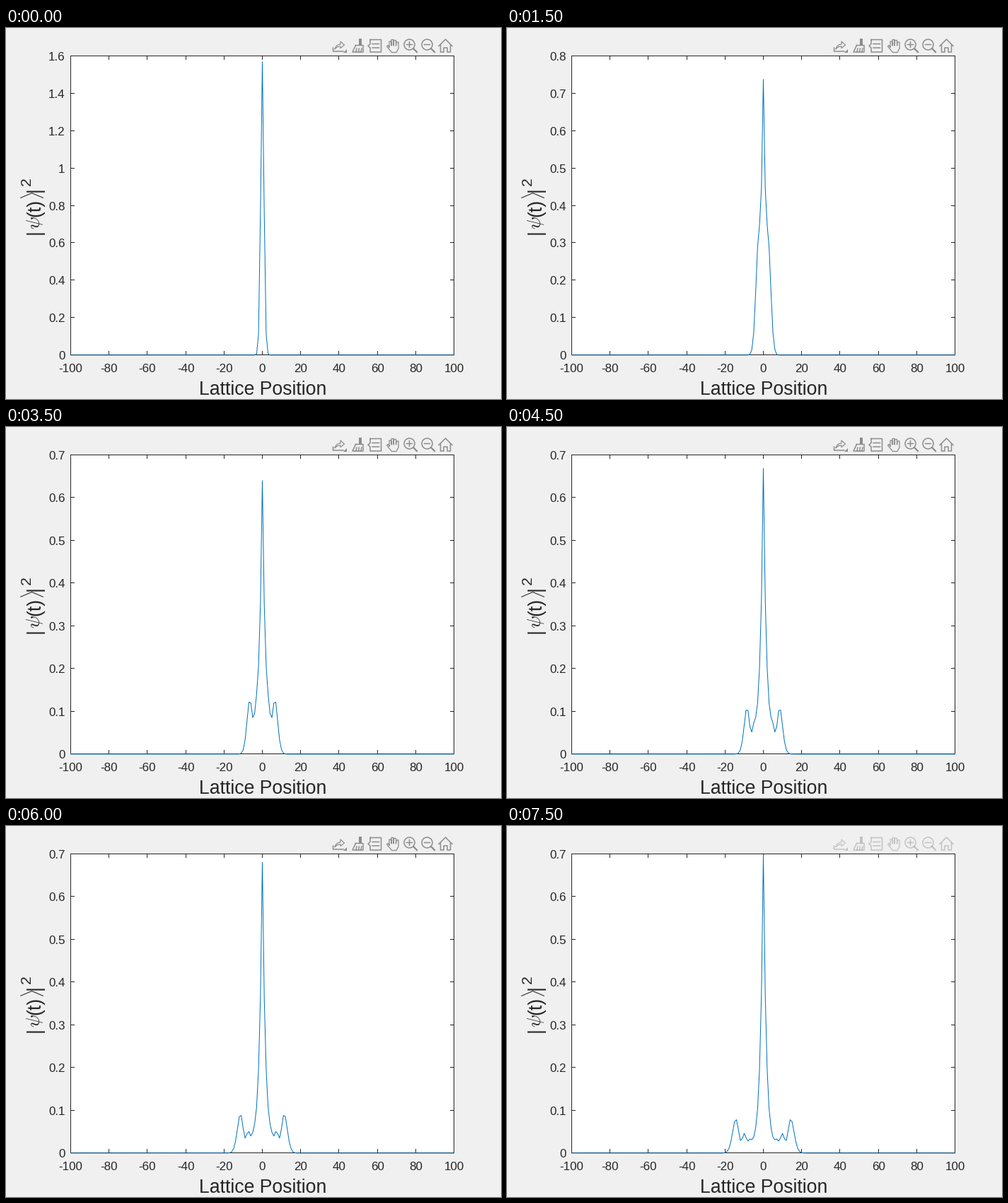
Recreate the animation shown at these times as a matplotlib script. Size 700 by 525 pixels, loop 8000 ms.

```python
import numpy as np
import matplotlib.pyplot as plt
from matplotlib.animation import FuncAnimation
from matplotlib.patches import Circle, Polygon, Rectangle

W, H, DPI = 700, 525, 100
PX = 72 / DPI                       # points per pixel
LEFT, RIGHT, TOP, BOTTOM = 91.5, 633.5, 39.5, 462.5
DARK, GREY, BLUE = "#262626", "#8c8c8c", "#0072bd"
STEPS, HOLD = 16, 500

SITES = np.arange(-100, 101)
SITE_X = np.linspace(LEFT, RIGHT, len(SITES))
DIST = np.abs(SITES)
THETA = (np.arange(720) + .5) * np.pi / 720
DEFECT = .35                        # strength of the trapping site


def bessel(n, t):
    """Integer-order J_n(t) from its integral form."""
    return np.cos(np.outer(n, THETA) - t * np.sin(THETA)).mean(axis=1)


def peak(k):
    """Central density: fast decay, slow regrowth and a damped beat."""
    beat = .12 * np.exp(-k / 4) * np.cos(2.06 * k)
    return .6 + .0063 * k + .85 * np.exp(-k / 1.15) + beat


def density(k):
    t = 1.1 + 1.02 * k
    # part bound to the central site
    bound = np.maximum(1.12 * .757 ** DIST - .12, 0) ** 2
    bound *= np.exp(-DIST ** 2 / t ** 4)
    # waves running outward on the lattice
    j = bessel(DIST, t)
    slope = (bessel(DIST - 1, t) - bessel(DIST + 1, t)) / 2
    passed = DIST ** 2 / (DIST ** 2 + (DEFECT * t) ** 2)
    return peak(k) * bound + passed * (1.27 * j ** 2 + 1.25 * slope ** 2)


def y_limit(k):
    step = .2 if peak(k) > 1 else .1
    return np.ceil(peak(k) / step) * step, step


fig = plt.figure(figsize=(W / DPI, H / DPI), dpi=DPI, facecolor="#f0f0f0")
ax = fig.add_axes([0, 0, 1, 1])
ax.set(xlim=(0, W), ylim=(H, 0))
ax.axis("off")


def line(xs, ys, color=DARK, lw=1, **kw):
    return ax.plot(xs, ys, color=color, lw=lw * PX, snap=False, **kw)[0]


def label(x, y, s, size, ha="center", **kw):
    return ax.text(x, y, s, fontsize=size * PX, ha=ha, va="baseline",
                   family="Liberation Sans", color=DARK, **kw)


# Plot box with fixed x ticks
ax.add_patch(Rectangle((LEFT, TOP), RIGHT - LEFT, BOTTOM - TOP,
                       fc="white", ec="none", zorder=0))
line([LEFT, RIGHT, RIGHT, LEFT, LEFT], [TOP, TOP, BOTTOM, BOTTOM, TOP],
     solid_joinstyle="miter")
for site in range(-100, 101, 20):
    x = SITE_X[site + 100]
    tick_x = np.floor(x) + .5
    line([tick_x, tick_x], [TOP, TOP + 5])
    line([tick_x, tick_x], [BOTTOM, BOTTOM - 5])
    label(x, 487, str(site), 17)

label(363, 519, "Lattice Position", 26.67)

# Rotated y label, set piece by piece
for s, x, y, size in [("|", 48, 288.5, 26.67), (r"$\psi$", 48, 276, 26.67),
                      ("(t)", 48, 254.5, 26.67), (r"$\rangle$", 48, 237, 26.67),
                      ("|", 48, 228.5, 26.67), ("2", 35, 217, 21.3)]:
    label(x, y, s, size, rotation=90, rotation_mode="anchor",
          math_fontfamily="cm")


def toolbar():
    """Row of axes tools; returns the artists so they can fade."""
    art = []

    def stroke(*pts, lw=1.5):
        art.append(line(*zip(*pts), color=GREY, lw=lw))

    def fill(*pts):
        art.append(ax.add_patch(Polygon(pts, fc=GREY, ec="none")))

    # export
    stroke((462.5, 28), (462.5, 33), (477, 33))
    stroke((465, 29.5), (467, 25.5), (470, 23.5), (473, 23), (473, 19),
           (478.5, 24), (473, 28.5), (473, 26), (469, 26.5), (465, 29.5),
           lw=1.2)
    fill((481.5, 29.5), (481.5, 34.5), (476.5, 34.5))
    # brush
    fill((499, 15), (503, 15), (503, 24), (499, 24))
    stroke((494.5, 24.5), (505, 24.5), (505, 34), (490, 34), (494.5, 24.5))
    for x in (495, 498.5, 502):
        stroke((x + .8, 29), (x, 34), lw=1.5)
    # data tip
    stroke((515, 16.5), (530.5, 16.5), (530.5, 34), (515, 34), (515, 28),
           (512, 25.3), (515, 22.5), (515, 16.5))
    for y in (22.5, 28):
        stroke((518, y), (527.5, y))
    # hand
    stroke((542, 27), (542, 19), (544.5, 19), (545, 25), (545, 16.5),
           (548, 16.5), (548, 25), (548.5, 17.5), (551.5, 17.5), (551.5, 25),
           (552, 20), (555, 20), (555, 29), (552, 34.5), (545.5, 34.5),
           (538.5, 26), (540, 24.5), (542, 27), lw=1.3)
    # zoom in, zoom out
    for x in (570.5, 595.5):
        art.append(ax.add_patch(Circle((x, 23.5), 7.5, fill=False, ec=GREY,
                                       lw=1.5 * PX)))
        stroke((x + 5.5, 29), (x + 10.5, 34), lw=2.2)
        stroke((x - 4, 23.5), (x + 4, 23.5))
    stroke((570.5, 19.5), (570.5, 27.5))
    # home
    stroke((612, 25.5), (621.5, 16), (631, 25.5))
    stroke((614.5, 24), (614.5, 34), (619, 34), (619, 28), (624, 28),
           (624, 34), (628.5, 34), (628.5, 24))
    return art


tools = toolbar()
curve = line(SITE_X, SITE_X * 0, color=BLUE, zorder=4)
y_ticks = line([], [])
y_labels = [label(83.5, 0, "", 17, ha="right") for _ in range(11)]


def update(k):
    top, step = y_limit(k)
    scale = (BOTTOM - TOP) / top
    curve.set_ydata(BOTTOM + .4 - density(k) * scale)

    values = np.arange(round(top / step) + 1) * step
    xs, ys = [], []
    for v in values:
        y = np.floor(BOTTOM - v * scale) + .5
        xs += [LEFT, LEFT + 5, np.nan, RIGHT, RIGHT - 5, np.nan]
        ys += [y, y, np.nan, y, y, np.nan]
    y_ticks.set_data(xs, ys)
    for i, text in enumerate(y_labels):
        shown = i < len(values)
        text.set_text(f"{values[i]:.2g}" if shown else "")
        if shown:
            text.set_y(BOTTOM + 6.5 - values[i] * scale)

    # the toolbar starts to fade out at the end
    for a in tools:
        a.set_alpha(.45 if k == STEPS - 1 else 1)
    return [curve, y_ticks, *y_labels, *tools]


anim = FuncAnimation(fig, update, frames=STEPS, init_func=lambda: update(0),
                     interval=HOLD, repeat=True, repeat_delay=0, blit=False)
plt.show()
```
